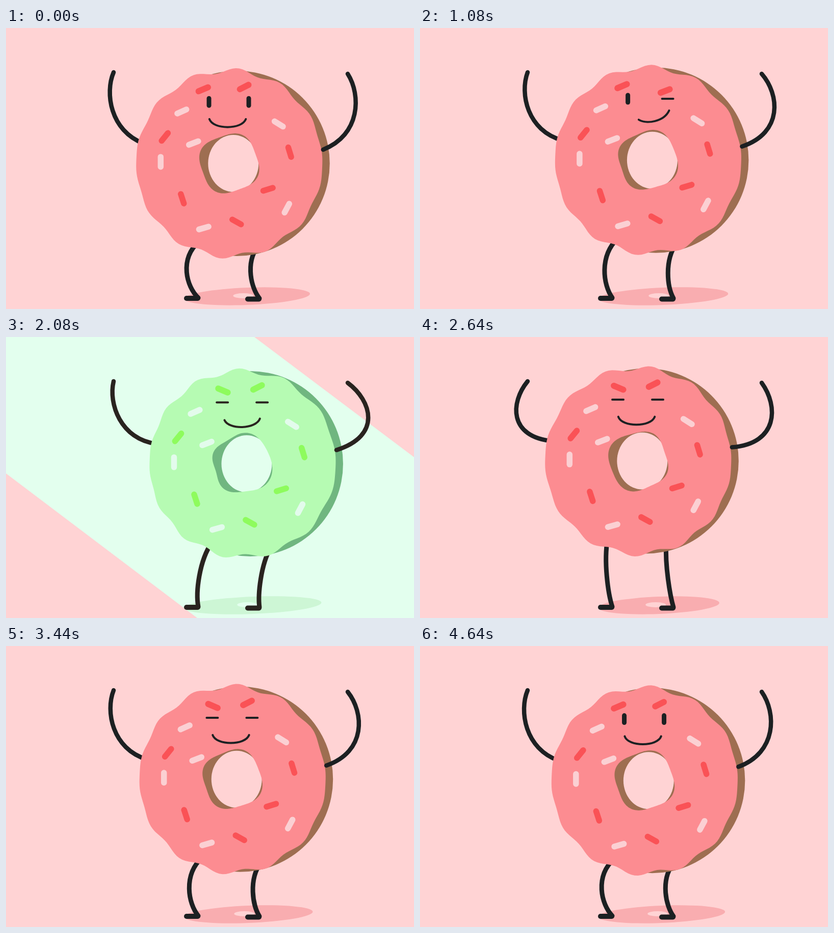
An HTML page with a canvas for the animation above (4680 ms loop, 800 by 552 pixels).

```html
<!DOCTYPE html>
<html lang="en">
<head>
<meta charset="utf-8">
<title>Dancing doughnut</title>
<style>
html, body { margin: 0; width: 100%; height: 100%; overflow: hidden; background: #ffd3d4; }
canvas { display: block; }
</style>
</head>
<body>
<canvas id="stage" width="800" height="552"></canvas>
<script>
const ctx = document.getElementById('stage').getContext('2d');
const LOOP = 4680, SWING = LOOP / 4, BEAT = LOOP / 8;
const RAD = Math.PI / 180;

const PINK = { bg: '#ffd3d4', icing: '#fc8c91', bold: '#fa5256', pale: '#fbd0d3', dough: '#9e6e51', shadow: '#f9adb0', ink: '#1c2022' };
const FLASHES = [
  { bg: '#fce4fb', icing: '#f1b5fe', bold: '#b966fb', pale: '#fbe2f8', dough: '#b972b4', shadow: '#f7cbf5', ink: '#1f262b' },
  { bg: '#e3ffee', icing: '#b6fbb3', bold: '#8efb5d', pale: '#e3fbec', dough: '#70b680', shadow: '#cdf6d5', ink: '#29231f' }
];

// Key poses of one swing: time, body x, body y, right end of the shadow
const POSES = [
  [0, 26.3, -17.2, 619],
  [240, -0.3, 0, 596],
  [530, -10.2, -22.4, 587],
  [820, 5.5, 0, 597]
];

// x, y, angle; pale and bold take turns
const SPRINKLES = [
  [345, 164, -24], [311.5, 214, -51], [303.5, 263, 90], [346, 335.5, 72], [388, 393, -16], [452.5, 381, 29],
  [551, 354, -62], [514, 317, -17], [535, 188.5, 32], [556.5, 244, 73], [368, 226, -21]
];

const mix = (a, b, k) => a + (b - a) * k;
const ramp = (t, from, to) => Math.min(1, Math.max(0, (t - from) / (to - from)));
const ease = k => (1 - Math.cos(Math.PI * k)) / 2;

function poseAt(t) {
  const time = (t + 230) % SWING;
  const i = POSES.findLastIndex(p => p[0] <= time);
  const from = POSES[i], to = POSES[(i + 1) % POSES.length];
  const k = ease(ramp(time, from[0], to[0] || SWING));
  return from.map((v, n) => mix(v, to[n], k)).slice(1);
}

function ellipse(x, y, rx, ry, angle, color) {
  ctx.fillStyle = color;
  ctx.beginPath();
  ctx.ellipse(x, y, rx, ry, angle, 0, 7);
  ctx.fill();
}

function polygon(color, ...points) {
  ctx.fillStyle = color;
  ctx.beginPath();
  points.forEach(p => ctx.lineTo(...p));
  ctx.fill();
}

function capsule(x, y, w, h, angle, color) {
  ctx.save();
  ctx.translate(x, y);
  ctx.rotate(angle * RAD);
  ctx.fillStyle = color;
  ctx.beginPath();
  ctx.roundRect(-w / 2, -h / 2, w, h, Math.min(w, h) / 2);
  ctx.fill();
  ctx.restore();
}

function curve(width, color, x, y, ...controls) {
  ctx.lineWidth = width;
  ctx.strokeStyle = color;
  ctx.beginPath();
  ctx.moveTo(x, y);
  ctx.bezierCurveTo(...controls);
  ctx.stroke();
}

// A limb of fixed length: the closer its ends, the more it bows to the side.
function limb(width, color, x0, y0, x1, y1, length, bow) {
  const dx = x1 - x0, dy = y1 - y0, span = Math.hypot(dx, dy);
  const bend = bow * Math.sqrt(Math.max(0, length ** 2 - span ** 2)) / span;
  const point = (along, out) => [x0 + dx * along - dy * bend * out, y0 + dy * along + dx * bend * out];
  curve(width, color, x0, y0, ...point(0.2, 0.62), ...point(0.68, 1), x1, y1);
}

// Closed path around the icing's centre, with its radius given by angle.
function ring(radius) {
  for (let deg = 0; deg < 360; deg += 2) {
    const a = deg * RAD, r = radius(a);
    ctx[deg ? 'lineTo' : 'moveTo'](438 + r * Math.cos(a), 266 + r * Math.sin(a));
  }
  ctx.closePath();
}

// The waves in the icing lag behind the sideways swing.
function drawIcing(color, x) {
  ctx.fillStyle = color;
  ctx.beginPath();
  ring(a => 182.5 - 5 * Math.sin(a) * Math.cos(13 * (a + 85 * RAD - 0.005 * x * Math.sin(a))));
  ring(a => 58 + 3.5 * Math.cos(4 * (a - 25 * RAD - 0.009 * x * Math.sin(a))));
  ctx.fill('evenodd');
}

function drawBackdrop(c) {
  ctx.fillStyle = c.bg;
  ctx.fillRect(0, 0, 800, 552);
  if (c === PINK) return;
  polygon(PINK.bg, [487, 0], [800, 0], [800, 236]);
  polygon(PINK.bg, [0, 268], [375, 552], [0, 552]);
}

function drawFace(c, t) {
  const wink = ramp(t, 620, 800) - ramp(t, 1200, 1380);
  const shut = ramp(t, 1680, 1860) - ramp(t, 4000, 4180);
  const frown = ease(ramp(t, 1340, 1880)) - ease(ramp(t, 3900, 4300));
  const smirk = ease(ramp(t, 380, 700)) * (1 - ramp(t, 813, 2286));
  const eye = (x, k) => capsule(x, 145.3, mix(9, 26, k), mix(23, 4, k), 0, c.ink);

  capsule(mix(387, 399.5, frown), mix(120.5, 122, frown), 32, 12, mix(-23, 23, frown), c.bold);
  capsule(467.3 + 4 * wink, 116 + 14 * wink, 31, 12, -27 + 6 * wink, c.bold);
  eye(398.2, shut);
  eye(476.2, Math.max(shut, wink));

  const smile = [399, 179, 406, 200, 463, 200, 470.5, 179];
  const grin = [424, 188, 442, 195, 470, 188, 481, 166];
  curve(4, c.ink, ...smile.map((v, i) => mix(v, grin[i], smirk)));
}

function draw(t) {
  const [x, y, tip] = poseAt(t);
  const beat = t % BEAT;
  const c = beat > 310 && beat < 384 ? FLASHES[Math.floor(t / BEAT) % 2] : PINK;

  drawBackdrop(c);
  ellipse((349 + tip) / 2, 527, (tip - 349) / 2, 17, -0.04, c.shadow);
  ellipse(465 + (tip - 595) * 0.35, 526, 20, 5, 0, c.bg);

  limb(8.5, c.ink, 211, 87, 270 + x, 227 + y, 168.7, 0.69);
  limb(9, c.ink, 377, 530, 378 + x, 420 + y, 134.5, -0.49);
  limb(9, c.ink, 497, 531, 493 + x, 430 + y, 126, -0.33);
  capsule(365, 531, 32, 10, 0, c.ink);
  capsule(485, 532.5, 32, 10, 0, c.ink);

  ctx.save();
  ctx.translate(x, y);
  ellipse(453, 266, 182, 182, 0, c.dough);
  ellipse(446, 266, 49.5, 56, 0, c.bg);
  drawIcing(c.icing, x);
  SPRINKLES.forEach(([sx, sy, angle], i) => capsule(sx, sy, 31, 11.5, angle, i % 2 ? c.bold : c.pale));
  drawFace(c, t);
  ctx.restore();

  limb(8.5, c.ink, 670, 90, 622 + x, 239 + y, 178.6, -0.71);
}

ctx.lineCap = 'round';
const start = performance.now();
function tick() {
  draw((performance.now() - start) % LOOP);
  requestAnimationFrame(tick);
}
tick();
</script>
</body>
</html>
```
